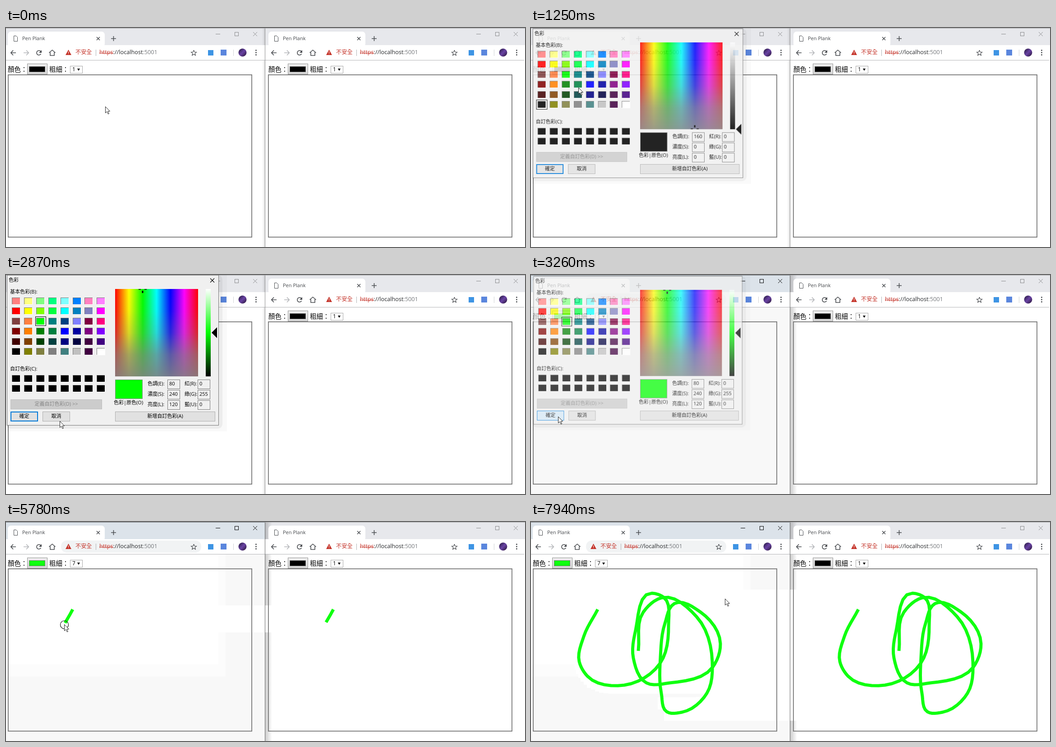
These frames come from a looping animation (1151 by 486 pixels, 8000 ms). An HTML page with a canvas:

```html
<!DOCTYPE html>
<html lang="zh-Hant">
<head>
<meta charset="utf-8">
<title>Pen Plank</title>
<style>
html, body { margin: 0; width: 100%; height: 100%; overflow: hidden; background: #fff; }
canvas { display: block; }
</style>
</head>
<body>
<canvas id="stage" width="1151" height="486"></canvas>
<script>
const stage = document.getElementById('stage').getContext('2d');
const layer = new OffscreenCanvas(490, 350).getContext('2d');
let g = stage;

const LOOP = 8000, PEN_DOWN = 5530, PEN_UP = 7640;
const LIME = '#10ff10';
const FONT = '"Open Sans","Noto Sans CJK TC","Noto Sans CJK",sans-serif';

const between = (t, a, b) => t >= a && t < b;
const ramp = (t, a, b) => Math.min(1, Math.max(0, (t - a) / (b - a)));
const smooth = u => u * u * (3 - 2 * u);

// Interpolates rows of [position, ...values]
function sample(rows, at, ease = u => u) {
  let i = rows.findIndex(r => r[0] >= at);
  if (i < 0) i = rows.length - 1;
  if (!i) return rows[0].slice(1);
  const a = rows[i - 1], b = rows[i], f = ease(ramp(at, a[0], b[0]));
  return a.slice(1).map((v, j) => v + (b[j + 1] - v) * f);
}

// Pointer stops outside the drawing: time, x, y
const stops = [
  [40, 220, 174], [200, 194, 166], [440, 194, 166], [800, 70, 90], [1100, 70, 90],
  [1250, 105, 132], [1770, 85, 108], [2250, 85, 108], [2600, 250, 345], [3030, 60, 314],
  [3300, 60, 314], [3750, 155, 90], [4100, 155, 90], [4470, 164, 203], [4930, 164, 203],
  [4990, 150, 194], [5130, 148, 194], [PEN_UP, 238, 286], [7940, 430, 170]
];
// Share of the trail covered over time
const pace = [[PEN_DOWN, 0], [5780, .02], [6290, .126], [6740, .407], [7140, .718], [PEN_UP, 1]];

const trail = spline([
  [148, 194], [117, 254], [107, 310], [125, 342], [207, 362], [286, 314], [305, 230],
  [294, 167], [268, 158], [232, 240], [227, 302], [256, 357], [308, 357], [403, 322],
  [420, 270], [376, 200], [318, 181], [297, 225], [287, 300], [289, 380], [301, 421],
  [335, 422], [390, 380], [402, 310], [367, 210], [290, 168], [249, 200], [238, 286]
]);

// Smooth curve through points, as rows of [share of length, x, y]
function spline(p) {
  const seg = p.slice(1).map((b, i) => [b[0] - p[i][0], b[1] - p[i][1]]);
  const len = seg.map(s => Math.hypot(...s));
  const dir = p.map((_, i) => {
    const a = Math.max(0, i - 1), b = Math.min(seg.length - 1, i);
    const d = [0, 1].map(k => seg[a][k] / len[a] * len[b] + seg[b][k] / len[b] * len[a]);
    return d.map(v => v / Math.hypot(...d));
  });
  const rows = [[0, ...p[0]]];
  seg.forEach((_, i) => {
    for (let n = 1; n <= 6; n++) {
      const u = n / 6, v = 1 - u, h = len[i] / 3;
      const [x, y] = [0, 1].map(k => {
        const a = p[i][k], b = p[i + 1][k];
        return v ** 3 * a + 3 * v * v * u * (a + h * dir[i][k]) +
          3 * v * u * u * (b - h * dir[i + 1][k]) + u ** 3 * b;
      });
      const [d, px, py] = rows[rows.length - 1];
      rows.push([d + Math.hypot(x - px, y - py), x, y]);
    }
  });
  const total = rows[rows.length - 1][0];
  return rows.map(([d, x, y]) => [d / total, x, y]);
}

const drawn = t => sample(pace, t)[0];
const pointer = t => between(t, PEN_DOWN, PEN_UP) ? sample(trail, drawn(t)) : sample(stops, t, smooth);

function rect(x, y, w, h, fill, border, lw = 1) {
  if (fill) { g.fillStyle = fill; g.fillRect(x, y, w, h); }
  if (border) {
    g.strokeStyle = border; g.lineWidth = lw;
    g.strokeRect(x + lw / 2, y + lw / 2, w - lw, h - lw);
  }
}
function round(x, y, w, h, r, fill) {
  g.fillStyle = fill; g.beginPath(); g.roundRect(x, y, w, h, r); g.fill();
}
function text(s, x, y, size, color = '#000', align = 'left') {
  g.font = `${size}px ${FONT}`; g.textBaseline = 'middle'; g.textAlign = align;
  g.fillStyle = color; g.fillText(s, x, y);
  return x + g.measureText(s).width;
}
function line(color, lw, ...paths) {
  g.strokeStyle = color; g.lineWidth = lw; g.beginPath();
  for (const p of paths)
    for (let i = 0; i < p.length; i += 2) g[i ? 'lineTo' : 'moveTo'](p[i], p[i + 1]);
  g.stroke();
}
function shape(fill, ...p) {
  g.fillStyle = fill; g.beginPath();
  for (let i = 0; i < p.length; i += 2) g.lineTo(p[i], p[i + 1]);
  g.closePath(); g.fill();
}
function disc(x, y, r, fill) {
  g.fillStyle = fill; g.beginPath(); g.arc(x, y, r, 0, 7); g.fill();
}
function fade(x0, y0, x1, y1, ...colors) {
  const f = g.createLinearGradient(x0, y0, x1, y1);
  colors.forEach((c, i) => f.addColorStop(i / (colors.length - 1), c));
  return f;
}
const cross = (x, y, r, color, lw) =>
  line(color, lw, [x - r, y - r, x + r, y + r], [x - r, y + r, x + r, y - r]);
const plus = (x, y, r, color, lw) =>
  line(color, lw, [x - r, y, x + r, y], [x, y - r, x, y + r]);

function backdrop(t, active) {
  rect(0, 0, 1151, 486, '#fff');
  rect(0, 0, 574, 38, active ? '#dce3ea' : '#e7e8ec');
  rect(575, 0, 576, 38, '#e7e8ec');
  if (active) rect(575, 0, 15, 486, fade(575, 0, 590, 0, 'rgba(0,0,0,.2)', 'rgba(0,0,0,0)'));
  else rect(568, 0, 6, 486, fade(568, 0, 574, 0, 'rgba(0,0,0,0)', 'rgba(0,0,0,.1)'));
  // A faint wash stays until the pen sweeps past
  if (t > 3100) {
    rect(0, 72, 574, 414, '#f8f8f8');
    if (t > 3400) { rect(0, 72, 487, 271, '#fcfcfc'); rect(0, 72, 471, 244, '#fff'); }
    for (let s = PEN_DOWN; s <= Math.min(t, PEN_UP); s += 25) {
      const [x, y] = pointer(s).map(Math.round);
      rect(x - 10, y - 9, 601 - x, 27, '#fff');
    }
  }
  rect(574, 0, 1, 486, active ? '#666' : '#8c8c8c');
  rect(0, 0, 1151, 1, '#a5a6a9');
  if (active) rect(0, 0, 574, 1, '#70757a');
}

function browser(right, active, color, size) {
  const dark = '#4a4d51', red = '#c5362c', ctl = active ? '#000' : '#8b8c8e';
  const edge = -3 * right;
  g.save();
  g.translate(right * 578, 0);
  // Tab strip
  round(4, 8, 215, 34, 7, '#fff');
  rect(edge, 38, 574, 33, '#fff');
  rect(edge, 71, 574, 1, '#b4b5b8');
  line(dark, 1, [17.5, 17.5, 22.5, 17.5, 25.5, 20.5, 25.5, 29.5, 17.5, 29.5, 17.5, 17.5]);
  text('Pen Plank', 36, 24, 11, '#44474b');
  cross(204.5, 23.5, 3.5, dark, 1.5);
  plus(238.5, 23.5, 5.5, dark, 1.6);
  line(ctl, 1, [465, 13.5, 475, 13.5]);
  rect(507, 9, 9, 9, null, ctl);
  cross(552.5, 13.5, 4.5, ctl, 1);
  // Toolbar
  if (active) round(122, 41, 311, 27, 13, '#f1f3f4');
  line(dark, 1.7, [22, 55, 11, 55], [16, 49.5, 10.8, 55, 16, 60.5]);
  line('#b5b7ba', 1.7, [39, 55, 50, 55], [45, 49.5, 50.2, 55, 45, 60.5]);
  g.strokeStyle = dark; g.beginPath(); g.arc(73, 55, 5, .5, 5.6); g.stroke();
  shape(dark, 79, 49, 79, 55, 73, 55);
  line(dark, 1.6, [95.5, 55, 102.5, 49, 109.5, 55], [98, 54, 98, 61, 107, 61, 107, 54]);
  shape(red, 138.5, 48, 145, 60, 132, 60);
  rect(138, 52, 1, 4, '#fff'); rect(138, 57, 1, 1, '#fff');
  text('不安全', 154, 55, 12.2, red);
  rect(199, 48, 1, 14, '#b0b2b5');
  let x = text('https', 207, 55, 12.7, red);
  line(red, 1, [207, 55.5, x, 55.5]);
  x = text('://localhost', x, 55, 12.7, '#26282b');
  text(':5001', x, 55, 12.7, '#777a7e');
  const star = [];
  for (let i = 0; i <= 10; i++) {
    const a = i * Math.PI / 5 - Math.PI / 2, r = i % 2 ? 2.8 : 6.3;
    star.push(416.5 + r * Math.cos(a), 55.5 + r * Math.sin(a));
  }
  line(dark, 1.2, star);
  rect(448, 49, 12, 12, '#3d94e4');
  rect(476, 48, 13, 13, '#5a86dd');
  rect(504, 48, 1, 14, '#d0d2d5');
  disc(524.5, 54.5, 9, fade(516, 46, 533, 63, '#251a3c', '#6942a4', '#2a1738'));
  for (const y of [49.5, 54.5, 59.5]) disc(554.5, y, 1.5, dark);
  // Page controls
  text('顏色：', 4, 93, 14.4);
  rect(47, 79, 45, 24, fade(0, 79, 0, 103, '#efefef', '#d8d8d8'), '#929292');
  rect(51, 85, 36, 13, color, '#777');
  text('粗細：', 96, 93, 14.4);
  rect(142, 84, 28, 17, '#fff', '#a6a6a6');
  text(size, 147, 93, 12);
  shape('#000', 158, 90, 164, 90, 161, 95);
  rect(4 - right, 103, 542, 362, null, '#767676', 1.8);
  g.restore();
}

function stroke(t, dx) {
  if (t <= PEN_DOWN) return;
  const s = drawn(t);
  const done = trail.filter(r => r[0] <= s).flatMap(r => r.slice(1));
  g.save();
  g.translate(dx, 0);
  g.lineJoin = 'round';
  line(LIME, 7, [...done, ...sample(trail, s)]);
  g.restore();
}

// One hex digit per channel, in steps of 16
const basic = ('f88 ff8 8f8 0f8 8ff 08f f8c f8f f00 ff0 8f0 0f4 0ff 08c 88c f0f ' +
  '844 f84 0f0 088 048 88f 804 f08 800 f80 080 084 00f 00a 808 80f ' +
  '400 840 040 044 008 004 404 408 000 880 884 888 488 ccc 404 fff').split(' ')
  .map(c => 'rgb(' + [...c].map(d => d === 'f' ? 255 : parseInt(d, 16) * 16) + ')');

function cell(i, y, color) {
  const cx = Math.round(13 + 26.9 * (i % 8)), cy = Math.round(y + 22.4 * (i >> 3));
  rect(cx, cy, 19, 16, '#fff');
  rect(cx, cy, 18, 15, '#777');
  rect(cx + 1, cy + 1, 17, 14, color);
}
function button(label, x, y, w, fill, border, color, lw) {
  rect(x, y, w, 22, fill, border, lw);
  text(label, x + w / 2, y + 11, 11, color, 'center');
}

function dialog(t) {
  const picked = t >= 1970, ready = t >= 2030, hover = t >= 2960;
  g.clearRect(0, 0, 490, 350);
  rect(0, 0, 490, 347, 'rgba(0,0,0,.025)');
  round(0, 0, 480, 341, 10, 'rgba(0,0,0,.05)');
  rect(2, 0, 470, 334, '#f0f0f0', '#777');
  text('色彩', 6, 12, 11);
  if (t < 3190) cross(457.5, 12, 4.5, '#000', 1.1);

  text('基本色彩(B):', 9, 38, 11);
  basic.forEach((c, i) => cell(i, 50, c));
  if (picked) rect(65, 92, 24, 21, null, '#000');
  else rect(10, 159, 25, 22, null, '#000');
  text('自訂色彩(C):', 9, 209, 11);
  for (let i = 0; i < 16; i++) cell(i, 222, '#000');

  button('定義自訂色彩(D) >>', 10, 276, 203, '#ccc', '#bfbfbf', '#868686');
  button('確定', 10, 303, 61, hover ? '#d5e8f6' : '#e1e1e1', '#0078d7', '#000', hover ? 1 : 2);
  button('取消', 81, 303, 61, '#e1e1e1', '#adadad');
  button('新增自訂色彩(A)', 242, 303, 222, '#e1e1e1', '#adadad');

  // Hue and saturation field, lightness bar
  const hues = [0, 60, 120, 180, 240, 300, 360].map(h => `hsl(${h},100%,50%)`);
  const greys = [0, .08, .3, .7, .9].map(a => `rgba(128,128,128,${a})`);
  rect(242, 31, 184, 194, fade(242, 0, 426, 0, ...hues));
  rect(242, 31, 184, 194, fade(0, 31, 0, 225, ...greys));
  const [mx, my, ay] = picked ? [303, 31, 128] : [364, 225, 225];
  g.save();
  g.beginPath(); g.rect(242, 31, 184, 194); g.clip();
  g.setLineDash([5, 8]);
  plus(mx, my, 9, '#000', 3);
  g.restore();
  rect(443, 31, 11, 194, fade(0, 31, 0, 225, '#fff', ready ? '#0f0' : '#808080', '#000'));
  shape('#000', 456, ay, 468, ay - 12, 468, ay + 12);

  rect(242, 232, 61, 43, picked ? '#0f0' : '#000', '#888');
  text('色彩|原色(O)', 239, 284, 11);
  const values = ready ? [80, 240, 120, 0, 255, 0] : [160, 0, 0, 0, 0, 0];
  ['色調(E):', '濃度(S):', '亮度(L):', '紅(R):', '綠(G):', '藍(U):'].forEach((label, i) => {
    const far = i > 2, y = Math.floor(232 + 23.4 * (i % 3)), x = far ? 425 : 358;
    text(label, far ? 396 : 314, y + 10, 11);
    rect(x, y, 28, 21, '#f0f0f0', '#7a7a7a');
    text(values[i], x + 4, y + 10, 11);
  });
}

// Draws the dialog as one sheet so that it fades as a whole
function showDialog(t) {
  const alpha = Math.min(ramp(t, 1130, 1270), 1 - ramp(t, 3200, 3420));
  if (!alpha) return;
  g = layer;
  dialog(t);
  g = stage;
  const k = 1 - .05 * (1 - alpha);
  g.save();
  g.globalAlpha = alpha;
  g.drawImage(layer.canvas, 237 * (1 - k), 167 * (1 - k), 490 * k, 350 * k);
  g.restore();
}

function sizeList(y) {
  const hot = Math.min(6, Math.max(0, Math.floor((y - 101) / 15.7)));
  rect(142, 101, 29, 111, '#fff', '#a6a6a6');
  for (let i = 0; i < 7; i++) {
    const top = 102 + Math.round(15.6 * i);
    if (i === hot) rect(143, top, 27, 15, '#1e90ff');
    text(i + 1, 147, top + 8, 12, i === hot ? '#fff' : '#000');
  }
}

const clicks = [950, 1970, 3060, 3950, 4660];

function arrow(t, x, y) {
  if (between(t, PEN_DOWN, PEN_UP + 20) || clicks.some(c => between(t, c, c + 120))) {
    g.strokeStyle = '#111'; g.lineWidth = 1.2;
    g.beginPath(); g.arc(x + .5, y + 1, 9, 0, 7); g.stroke();
  }
  const p = [0, 0, 0, 14, 3.2, 11, 6, 16.5, 8, 15.5, 5.5, 10.3, 10, 10.3, 0, 0]
    .map((v, i) => v + (i % 2 ? y : x) + .5);
  shape('#fff', ...p);
  line('#222', 1, p);
}

function draw(t) {
  const active = between(t, 980, 1150) || t >= 3100;
  const [x, y] = pointer(t).map(Math.round);
  backdrop(t, active);
  browser(0, active, t >= 3200 ? LIME : '#000', t >= 4720 ? '7' : '1');
  browser(1, false, '#000', '1');
  stroke(t - 22, 0);
  stroke(t - 33, 578);
  showDialog(t);
  if (between(t, 3980, 4720)) sizeList(y);
  arrow(t, x, y);
}

const start = performance.now();
function tick() {
  draw((performance.now() - start) % LOOP);
  requestAnimationFrame(tick);
}
tick();
</script>
</body>
</html>
```
